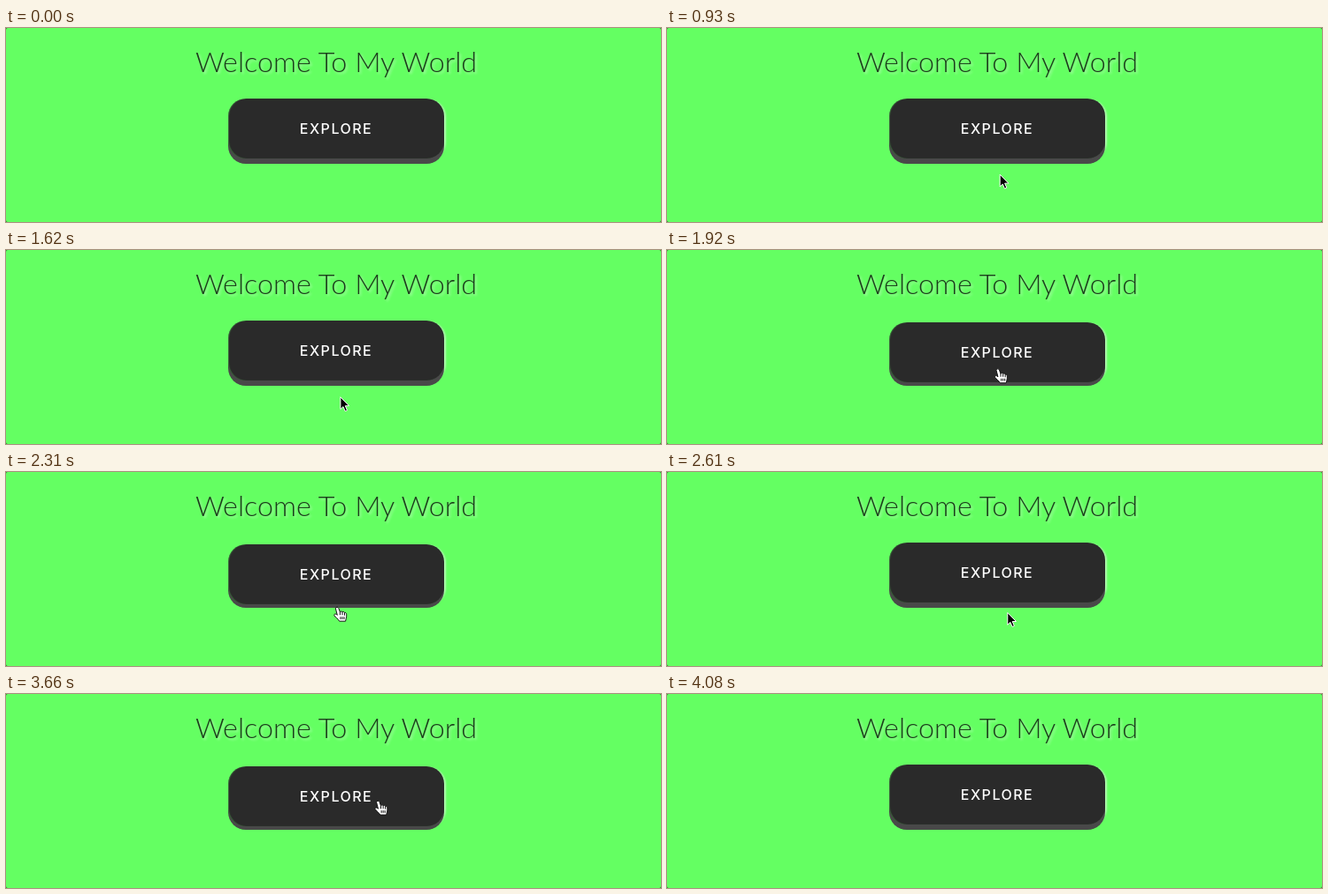
These frames come from a looping animation (740x220 px, 4110 ms). An HTML page:

```html
<!DOCTYPE html>
<html lang="en">
<head>
<meta charset="utf-8">
<title>Explore button</title>
<style>
  html, body { margin: 0; width: 100%; height: 100%; overflow: hidden; background: #2c6e2c; }
  #stage {
    position: relative; width: 740px; height: 220px; overflow: hidden;
    background: #64ff62; border-radius: 2px;
  }
  h1 {
    position: absolute; left: 0; top: 18px; width: 746px; margin: 0;
    font: 300 32.3px/40px Lato, sans-serif; text-align: center; white-space: nowrap;
    color: #1c3c1c; text-shadow: 2px 2px 3px rgba(255, 255, 255, .4);
  }
  #button {
    --lift: 6px;
    position: absolute; left: 251px; top: calc(86px - var(--lift)); width: 244px; height: 68px;
    border-radius: 20px; background: #2a2a2a; color: #fff;
    font: 500 16px/68px Inter, sans-serif; letter-spacing: 1.5px; text-align: center;
    box-shadow: inset 1px 0 1px rgba(100, 255, 98, .3),
      0 var(--lift) #494949, 2px 1px 2px rgba(255, 255, 255, .5);
  }
  #button.hover { --lift: 4px; }
  svg { position: absolute; left: 0; top: 0; }
</style>
</head>
<body>
<div id="stage">
  <h1>Welcome To My World</h1>
  <div id="button">EXPLORE</div>
  <svg width="740" height="220" stroke-linejoin="round">
    <g id="cursor">
      <path id="arrow" stroke="#fff" d="M0 0V13.8L3.1 10.9L5.3 16L7.6 15L5.4 10H9.7Z"/>
      <g id="hand" stroke="#111">
        <path fill="#fff" d="M-2.4 1.2C-2.2-.7 .3-1 1 .8L2.6 5.2C3.2 4 4.8 4 5.2 5.2C6 4.3 7.4 4.7 7.7 6C8.7 5.4 9.8 6.2 9.9 7.6C10.2 11 9.3 12.5 8.8 15.5H1.8C.6 13-2.6 11-3.9 9C-4.4 7.2-2.3 6.6-.5 8.6Z"/>
        <path fill="none" d="M2.6 5V8.5M5.2 5.2V8.5M7.7 6V9M3.2 10.5V13.3M5.2 10.5V13.3M7.2 10.5V13.3"/>
      </g>
    </g>
  </svg>
</div>
<script>
const LOOP = 4110;
const BUTTON_BOTTOM = 154;

const easeOut = u => 1 - (1 - u) ** 2;
const easeIn = u => u ** 3;
const smooth = u => u * u * (3 - 2 * u);

// Pointer moves between a few stops, resting in the gaps
const entry = { x: 380, y: 222 };
const moves = [
  { start: 800, end: 1200, x: 373, y: 120, ease: easeOut },
  { start: 1350, end: 1650, x: 378, y: 168, ease: smooth },
  { start: 1650, end: 2070, x: 373, y: 122, ease: smooth },
  { start: 2130, end: 2450, x: 376, y: 175, ease: smooth },
  { start: 2450, end: 2900, x: 406, y: 122, ease: smooth },
  { start: 3090, end: 3270, x: 421, y: 121, ease: smooth },
  { start: 3570, end: 4080, x: 410, y: 222, ease: easeIn }
];

function pointerAt(time) {
  let { x, y } = entry;
  for (const move of moves) {
    if (time < move.start) break;
    const u = move.ease(Math.min(1, (time - move.start) / (move.end - move.start)));
    x += (move.x - x) * u;
    y += (move.y - y) * u;
  }
  return { x, y };
}

const [button, cursor, arrow, hand] =
  ['button', 'cursor', 'arrow', 'hand'].map(id => document.getElementById(id));
const show = (el, on) => el.setAttribute('visibility', on ? 'visible' : 'hidden');

function draw(time) {
  const { x, y } = pointerAt(time);
  const hover = y < BUTTON_BOTTOM;
  button.classList.toggle('hover', hover);
  show(arrow, !hover);
  show(hand, hover);
  cursor.setAttribute('transform', `translate(${x} ${y})`);
}

const start = performance.now();
function tick() {
  draw((performance.now() - start) % LOOP);
  requestAnimationFrame(tick);
}
tick();
</script>
</body>
</html>
```
